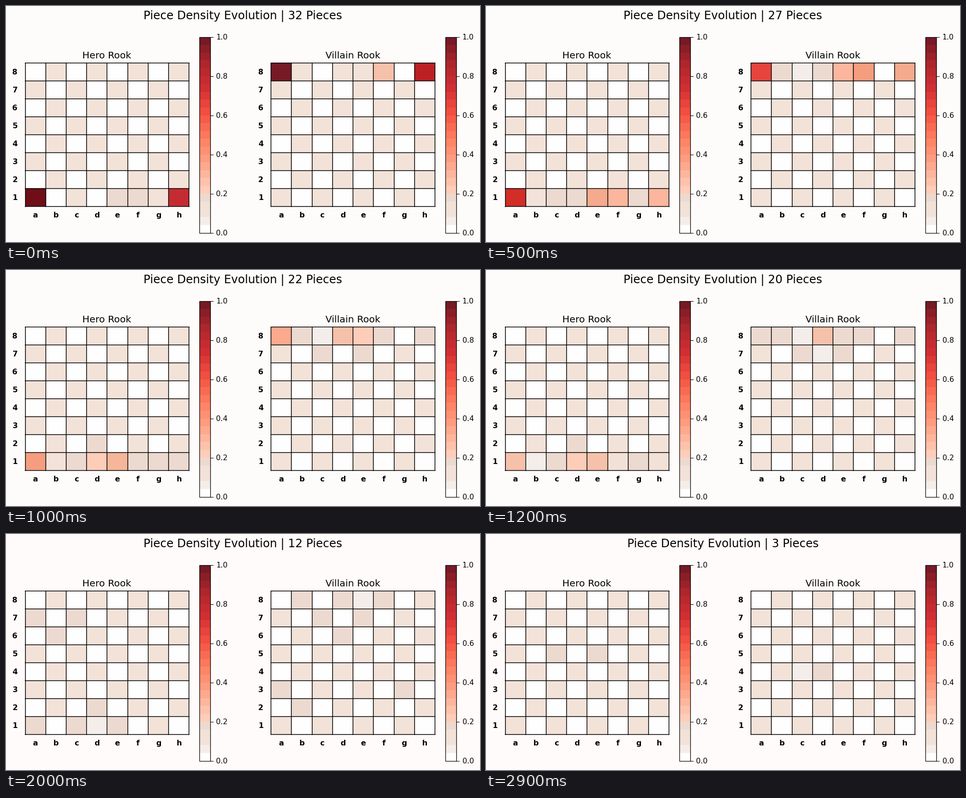
These frames come from a looping animation (1000x500 px, 3000 ms). A matplotlib script:

```python
import numpy as np
import matplotlib.pyplot as plt
from matplotlib.animation import FuncAnimation
from matplotlib.patches import Rectangle

plt.rcParams["font.family"] = "DejaVu Sans"

FRAMES, START_PIECES = 30, 32
CELL_W, CELL_H, BOARD_TOP = 43.24, 38.0, 120.7
FILES = "abcdefgh"
BANDS = 25
BAR_TOP, BAR_BOTTOM = 65.5, 480.5
PALE = ["#fefefe", "#f4edea", "#f3e2d9", "#f2e1d7", "#ecdad0"]
DARK_EMPTY, DARK_FAINT = "#f2e2d8", "#ecdad0"
DARK_BASE = np.array([181, 136, 99]) / 255

# Rook density in percent per square, keyed by animation step.
HERO = {
    0: "a1 100 e1 10 f1 17 h1 77",
    2: "a1 91 b1 6 c1 10 d1 12 e1 30 f1 30 h1 41",
    7: "a1 53 b1 12 c1 10 d1 24 e1 30 f1 30 g1 10 h1 24",
    12: "a1 21 b1 6 c1 10 d1 22 e1 21 f1 12 g1 10 h1 12 d2 10",
    16: "a1 10 c1 10 d1 12 e1 10 f1 6 a7 10 c7 10 d2 10",
    24: "a7 10 b6 10",
    29: "c5 10 e5 10",
}
VILLAIN = {
    0: "a8 100 e8 10 f8 22 h8 78",
    2: "a8 87 b8 10 d8 10 e8 34 f8 34 h8 41",
    7: "a8 55 b8 10 c8 10 d8 26 e8 30 f8 31 h8 25",
    12: "a8 17 b8 10 c8 6 d8 21 e8 17 f8 10 h8 10 c7 10 d7 6 e7 10",
    16: "a8 6 b8 10 c8 6 d8 10 e8 12 f8 10 c7 10 e7 10 d6 10 b2 10",
    24: "a3 10 b3 6 g3 10",
    29: "c4 6 d4 10",
}


def density_grid(text):
    grid = np.zeros((8, 8))
    words = text.split()
    for square, percent in zip(words[::2], words[1::2]):
        grid[int(square[1]) - 1, FILES.index(square[0])] = int(percent) / 100
    return grid


def density_at(keys, step):
    """Blend linearly between the two nearest keyed grids."""
    steps = sorted(keys)
    left = max(s for s in steps if s <= step)
    right = min(s for s in steps if s >= step)
    mix = (step - left) / (right - left) if right > left else 0
    return (1 - mix) * density_grid(keys[left]) + mix * density_grid(keys[right])


def heat(value):
    band = min(int(value * BANDS + 1e-6), BANDS - 1)
    if band < len(PALE):
        return PALE[band]
    return 0.9 * np.array(plt.cm.Reds(band / (BANDS - 1))[:3]) + 0.1


def cell_color(value, dark):
    if not dark:
        return heat(value)
    if value < 0.04:
        return DARK_EMPTY
    if value < 0.2:
        return DARK_FAINT
    return heat(value) - 0.1 * (1 - DARK_BASE)


fig = plt.figure(figsize=(10, 5), dpi=100)
ax = fig.add_axes([0, 0, 1, 1])
ax.set_xlim(0, 1000)
ax.set_ylim(500, 0)
ax.axis("off")


def label(x, y, text, size, **style):
    return ax.text(x, y, text, fontsize=size, va="baseline", **style)


def box(x, y, w, h, **style):
    return ax.add_patch(Rectangle((x, y), w, h, **style))


def draw_board(left, title):
    right, bottom = left + 8 * CELL_W, BOARD_TOP + 8 * CELL_H
    box(left, BOARD_TOP, right - left, bottom - BOARD_TOP, fc=PALE[0], ec="none")
    cells = [[box(left + CELL_W * col, bottom - CELL_H * (row + 1), CELL_W, CELL_H, lw=0)
              for col in range(8)] for row in range(8)]
    for i in range(9):
        x, y = left + CELL_W * i, BOARD_TOP + CELL_H * i
        ax.plot([x, x], [BOARD_TOP, bottom], color="black", lw=1.1)
        ax.plot([left, right], [y, y], color="black", lw=1.1, snap=False)
    for i, name in enumerate(FILES):
        label(left + CELL_W * (i + 0.5), 448, name, 11.3, ha="center", weight="bold")
        label(left - 21.5, bottom - CELL_H * (i + 0.5) + 5.3, str(i + 1), 11.3,
              ha="center", weight="bold")
    label((left + right) / 2 - 0.4, 111, title, 14.4, ha="center")
    return cells


def draw_colorbar(left):
    band_h = (BAR_BOTTOM - BAR_TOP) / BANDS
    # Each band reaches the top and is covered by the next, so no seams show.
    for i in range(BANDS):
        box(left, BAR_TOP, 23, band_h * (BANDS - i),
            fc=heat((i + 0.5) / BANDS), lw=0, antialiased=False)
    box(left, BAR_TOP, 23, BAR_BOTTOM - BAR_TOP, fc="none", ec="black", lw=0.9)
    for i in range(6):
        y = BAR_BOTTOM - (BAR_BOTTOM - BAR_TOP) * i / 5
        ax.plot([left + 23, left + 28.5], [y, y], color="black", lw=0.8)
        label(left + 35.5, y + 5.5, f"{i / 5:.1f}", 11.2, ha="left")


boards = [(draw_board(left, title), keys, left) for left, title, keys in
          [(40.5, "Hero Rook", HERO), (559.2, "Villain Rook", VILLAIN)]]
draw_colorbar(408)
draw_colorbar(927)
headline = label(500, 28, "", 17.25, ha="center")


def update(step):
    fig.set_facecolor("#fdfcfa" if step < 14 else "#fffbfa")
    headline.set_text(f"Piece Density Evolution | {START_PIECES - step} Pieces")
    for cells, keys, left in boards:
        grid = density_at(keys, step)
        for row, col in np.ndindex(8, 8):
            value, dark = grid[row, col], (row + col) % 2 == 0
            # Faint tints on light squares keep a thin pale rim.
            rim = 2 if not dark and 0.04 <= value < 0.08 else 0
            cell = cells[row][col]
            cell.set_facecolor(cell_color(value, dark))
            cell.set_bounds(left + CELL_W * col + rim,
                            BOARD_TOP + CELL_H * (7 - row) + rim,
                            CELL_W - 2 * rim, CELL_H - 2 * rim)
    return []


anim = FuncAnimation(fig, update, frames=FRAMES, interval=100, repeat=True)
plt.show()
```
